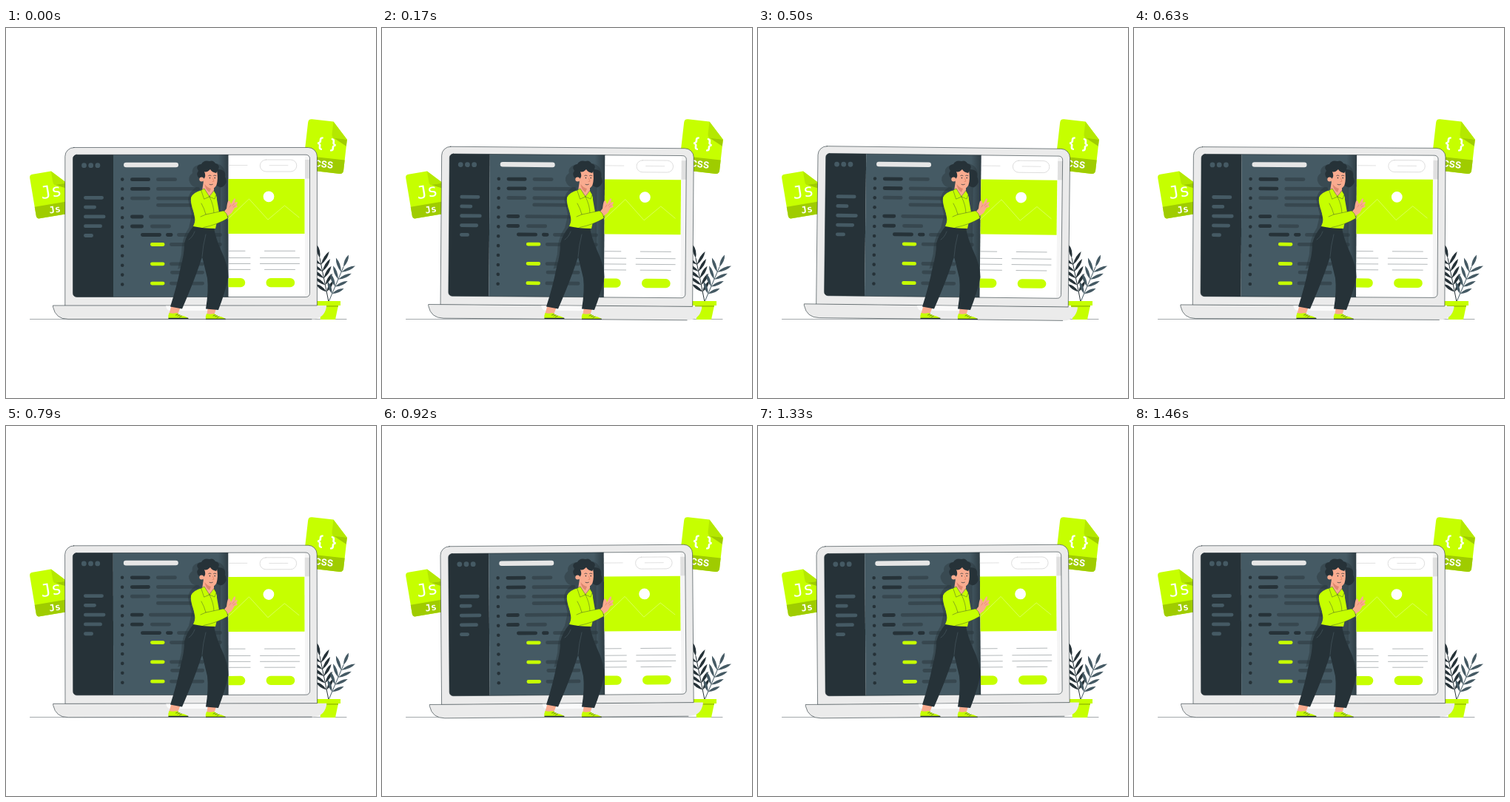
Recreate the animation shown at these times as an HTML page with a canvas. Size 500 px wide and 500 px high, loop 1.5 s.

```html
<!DOCTYPE html>
<html lang="en">
<head>
<meta charset="utf-8">
<title>Laptop</title>
<style>
html, body { margin: 0; width: 100%; height: 100%; overflow: hidden; background: #fff; }
canvas { display: block; width: 500px; height: 500px; }
</style>
</head>
<body>
<canvas id="stage"></canvas>
<script>
const canvas = document.getElementById('stage');
const ctx = canvas.getContext('2d');
const ratio = window.devicePixelRatio || 1;
canvas.width = canvas.height = 500 * ratio;

const LOOP = 1500;
const LIME = '#c6ff00', BAND = '#9fcc00', FOLD = '#b4e800';
const INK = '#263238', SLATE = '#455a64', CODE = '#37474f';
const GREY = '#ebebeb', SKIN = '#f9ab8f', BLUSH = '#d9775d';
const radians = degrees => degrees * Math.PI / 180;

function shape(d, fill, stroke, width = 0.6) {
  const path = new Path2D(d);
  if (fill) { ctx.fillStyle = fill; ctx.fill(path); }
  if (stroke) { ctx.strokeStyle = stroke; ctx.lineWidth = width; ctx.stroke(path); }
}

function box(x, y, w, h, r, fill, stroke, width = 0.6) {
  ctx.beginPath();
  ctx.roundRect(x, y, w, h, r);
  if (fill) { ctx.fillStyle = fill; ctx.fill(); }
  if (stroke) { ctx.strokeStyle = stroke; ctx.lineWidth = width; ctx.stroke(); }
}

function disc(x, y, r, fill) {
  ctx.beginPath();
  ctx.arc(x, y, r, 0, Math.PI * 2);
  ctx.fillStyle = fill;
  ctx.fill();
}

const bar = (x1, x2, y, color, h = 4.8) => box(x1, y - h / 2, x2 - x1, h, h / 2, color);
const rule = (x1, x2, y, color) => shape(`M${x1} ${y}H${x2}`, null, color, 0.7);

function label(text, x, y, font) {
  ctx.font = font;
  ctx.textAlign = 'center';
  ctx.fillStyle = '#fff';
  ctx.fillText(text, x, y);
}

function fileIcon(x, y, degrees, scale, drawLabels) {
  ctx.save();
  ctx.translate(x, y);
  ctx.rotate(radians(degrees));
  ctx.scale(scale, scale);
  shape('M5 0H34L55 22V64Q55 69 50 69H5Q0 69 0 64V5Q0 0 5 0Z', LIME);
  shape('M0 50H55V64Q55 69 50 69H5Q0 69 0 64Z', BAND);
  shape('M35 21L55 22V31Z', BAND);
  shape('M34 0L55 22H39Q34 22 34 17Z', FOLD);
  drawLabels();
  ctx.restore();
}

function leaf(x, y, angle, length, color) {
  ctx.save();
  ctx.translate(x, y);
  ctx.rotate(angle);
  shape(`M0 0Q${length * 0.55} 4 ${length} 0Q${length * 0.55} -4 0 0Z`, color);
  ctx.restore();
}

// A straight stem with pairs of leaves that shrink towards the root.
function frond(x, y, tipX, tipY, pairs, length, color) {
  const angle = Math.atan2(tipY - y, tipX - x);
  shape(`M${x} ${y}L${tipX} ${tipY}`, null, color, 1);
  leaf(tipX, tipY, angle, length, color);
  for (let i = 0; i < pairs; i++) {
    const t = 0.85 - 0.62 * i / (pairs - 1);
    const px = x + (tipX - x) * t, py = y + (tipY - y) * t;
    for (const side of [-1, 1]) leaf(px, py, angle + side * radians(43), length * (0.9 + 0.3 * t), color);
  }
}

function drawPlant() {
  frond(436, 370, 424, 311, 5, 18, INK);
  frond(436, 370, 456, 323, 4, 18, SLATE);
  shape('M423 375H449L445 394H425Z', LIME);
  box(423, 375, 26, 1.8, 0, BAND);
  box(419, 369, 33, 6, 0, LIME);
}

function drawSidebar() {
  box(90, 170, 55, 195, 0, INK);
  for (let i = 0; i < 3; i++) disc(105.5 + i * 9.2, 185.7, 3.4, SLATE);
  [132, 122, 134.5, 130, 118].forEach((end, i) => bar(105, end, 229.3 + i * 12.8, SLATE));
}

function drawShadow() {
  shape('M263 184Q250 187 252 196Q244 202 249 210Q252 215 257 215Q247 222 246 232L251 253' +
    'L247 270Q237 284 237 306L232 326L290 300V216Q298 212 296 200Q297 187 285 183Z', 'rgba(38,50,56,.4)');
  const edge = ctx.createLinearGradient(287, 0, 301, 0);
  edge.addColorStop(0, 'rgba(38,50,56,0)');
  edge.addColorStop(1, 'rgba(38,50,56,.75)');
  box(287, 170, 14, 195, 0, edge);
}

function drawEditor() {
  box(145, 170, 156, 195, 0, SLATE);
  bar(159, 233, 185, '#e6e6e6', 6.6);
  for (let i = 0; i < 12; i++) disc(157.2, 204.6 + i * 12.9, 2.3, INK);
  for (let i = 0; i < 3; i++) {
    const y = 204.7 + i * 12.7;
    bar(168, 195, y, i < 2 ? INK : CODE);
    bar(203, i ? 262 : 231, y, CODE);
  }
  bar(203, 262, 239.3, CODE);
  for (let i = 0; i < 2; i++) {
    bar(168, 186, 255 + i * 13, INK);
    bar(193 + i * 2, i ? 223 : 258, 255 + i * 13, CODE);
  }
  bar(182, 210, 279.5, INK);
  bar(216, 225.5, 279.5, INK);
  bar(231, 292, 279.5, CODE);
  for (let i = 0; i < 3; i++) {
    const y = 292.5 + i * 26.3;
    bar(195, 214.5, y, LIME);
    bar(221, i ? 268 : 292, y, CODE);
  }
  bar(222, 268, 330.3, CODE);
  drawShadow();
}

function drawPage() {
  box(300.5, 170, 111, 195, 0, '#fff');
  box(404, 170, 7, 195, 0, '#f5f5f5');
  box(404, 178, 7, 25.5, 0, '#e0e0e0');
  rule(301, 326, 185.5, '#d5d5d5');
  box(343.3, 178, 49.5, 16, 8, null, '#cfcfcf', 0.7);
  rule(356, 381, 185.7, '#d5d5d5');
  box(300.5, 204, 103, 74, 0, LIME);
  shape('M300 258L328.5 231L354 259L376.5 240L396 256', null, '#e2ff80', 0.7);
  disc(355, 227.8, 7.4, '#fff');
  for (let i = 0; i < 4; i++) {
    const y = i ? 302.7 + i * 7.9 : 301.3;
    const half = i % 3 ? 26.5 : 20.5;
    rule(301, i ? 330 : 323, y, '#939a9d');
    rule(370 - half, 370 + half, y, '#939a9d');
  }
  box(300.5, 338, 22.7, 12.3, [0, 6.1, 6.1, 0], LIME);
  box(351.5, 338, 38.7, 12.3, 6.1, LIME);
}

function drawLaptop(degrees) {
  ctx.save();
  ctx.translate(249, 277);
  ctx.rotate(radians(degrees));
  ctx.translate(-249, -277);
  box(79.8, 161.5, 340.6, 214, [12, 12, 0, 0], GREY, INK);
  ctx.save();
  ctx.beginPath();
  ctx.roundRect(90.5, 171.3, 320, 192.2, 5);
  ctx.clip();
  drawSidebar();
  drawEditor();
  drawPage();
  ctx.restore();
  box(90.5, 171.3, 320, 192.2, 5, null, INK);
  shape('M63.5 375H433V377Q430 393.5 413 393.5H84Q67 393.5 63.5 377Z', GREY);
  shape('M413 393.5H84Q67 393.5 63.5 377V375H420', null, INK);
  shape('M216 375.4H285Q284 382 279 382H222Q217 382 216 375.4Z', '#fafafa');
  ctx.restore();
}

function shoe(x, y) {
  ctx.save();
  ctx.translate(x, y);
  shape('M1 0Q6 1.5 11 0L17 3.5Q26 5 27 8H0Q-1 4 1 0Z', LIME);
  shape('M0 6.8H26.7L27 8H0Z', INK);
  for (let i = 0; i < 3; i++) shape(`M${10 + i * 2.5} ${3 + i * 1.2}l3 -1.4`, null, INK);
  ctx.restore();
}

function drawLegs() {
  shape('M224 374L236 377L232 387H220Z', SKIN);
  shape('M273 377L284 379L281 389H271Z', SKIN);
  shoe(219.5, 385);
  shoe(270, 386);
  shape('M254 267L281 270Q283 283 290 299Q301 322 300.5 337Q296 358 287 381L270 379.5' +
    'Q274 355 272 338L265 309Q256 338 238 379.5L222 376.5Q231 349 236 323Q241 306 241 291Q244 279 254 267Z', INK);
  shape('M265 309Q266 294 270 279M247 286Q252 283 255 275', null, '#52646d', 0.5);
}

function drawTorso() {
  shape('M267 207L281 214V224L273 230L265 220Z', SKIN);
  shape('M265 219Q270 225 276 227L281 222Q285 225 285 232L288 249L283 271Q267 271 253 268' +
    'Q258 258 253 247Q249 236 250 229Q253 222 265 219Z', LIME);
  shape('M264 219L268 217L275 228L268 231ZM281 220L284 225L282 231L275 228Z', LIME, INK, 0.4);
  shape('M275 228Q281 240 281 251', null, INK, 0.4);
}

function drawHead() {
  shape('M286 191Q298 191 296 201Q300 208 295 213Q289 218 284 212Z', INK);
  shape('M267 190Q277 184 285 193Q287 204 284.5 212Q282 218 276 217Q268 214 266.5 207Z', SKIN);
  shape('M268.5 211Q272 216 277 217L275 222Q269 218 268.5 211Z', '#de8770');
  shape('M261 203Q256 198 260 193Q255 186 264 184Q267 178 275 180Q280 178 283 183' +
    'Q290 185 287 191L284 196Q278 195 276 191Q271 196 268 194Q271 201 267 204Q265 200 261 203Z', INK);
  disc(264.3, 204.5, 3, SKIN);
  for (const x of [275.4, 282.2]) {
    disc(x, 202.6, 0.8, INK);
    shape(`M${x - 1.6} 199.5q1.6 -1.2 3.2 0`, null, INK, 0.7);
  }
  shape('M279.4 203L281 207.2L279 207.5', null, BLUSH);
  shape('M275 211.4Q277 212.6 279.3 211.3', null, INK, 0.7);
}

function drawArm() {
  shape('M294 249L298 244Q299 236 300 234Q302 232 303 235L304 238L308 231Q310 229 310 232' +
    'L309 236L312 235Q314 236 311 239L313 241Q312 243 309 243L305 250L298 255Z', SKIN);
  shape('M304 239L302 242M308.5 237L306 240M310 240L307 242', null, BLUSH, 0.5);
  shape('M250 230Q257 224 263 233Q268 243 270 252L294 247Q299 250 300 257Q285 266 266 270' +
    'Q257 269 255 256Z', LIME);
  shape('M264 237Q268 244 270 252L294 247Q299 250 300 257Q285 266 267 269.5M270 252L263 255',
    null, INK, 0.4);
}

// Linear swing through 0, 1, 0 and -1 degrees.
function swing(phase) {
  const p = (phase + 0.25) % 1;
  return 1 - Math.abs(4 * p - 2);
}

function draw() {
  const phase = performance.now() % LOOP / LOOP;
  ctx.setTransform(ratio, 0, 0, ratio, 0, 0);
  ctx.fillStyle = '#fff';
  ctx.fillRect(0, 0, 500, 500);
  ctx.lineJoin = ctx.lineCap = 'round';
  rule(32.5, 460, 393.5, '#7d8588');
  fileIcon(31.5, 198.5, -9.5, 0.875, () => {
    label('Js', 29, 40, '27px "DejaVu Sans Mono", monospace');
    label('Js', 30, 64, 'bold 14.5px "DejaVu Sans Mono", monospace');
  });
  fileIcon(408.7, 122.7, 6.5, 1, () => {
    label('{  }', 28.3, 37.5, 'bold 19.5px Inter, sans-serif');
    label('CSS', 27.5, 63, 'bold 12.5px Inter, sans-serif');
  });
  drawPlant();
  drawLaptop(swing(phase));
  drawLegs();
  drawTorso();
  drawHead();
  drawArm();
  requestAnimationFrame(draw);
}

draw();
</script>
</body>
</html>
```
